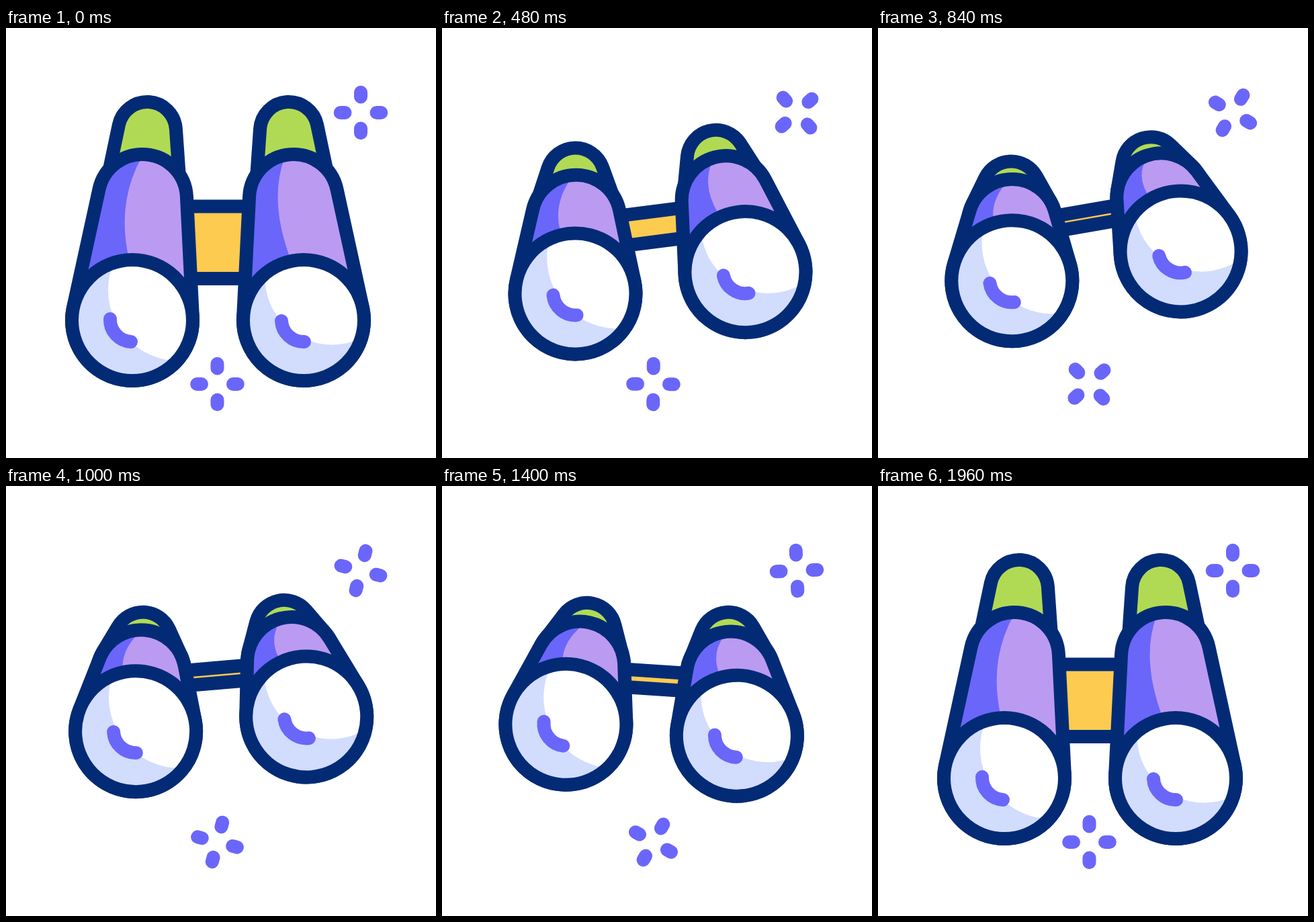
An HTML page that plays this animation: 640 px wide and 640 px high, repeating every 2000 ms.

```html
<!DOCTYPE html>
<html lang="en">
<head>
<meta charset="utf-8">
<title>Binoculars</title>
<style>
  html, body { margin: 0; width: 100%; height: 100%; overflow: hidden; background: #fff; }
  svg { display: block; width: 100vw; height: 100vh; }
  .line { stroke: #032b75; stroke-width: 20; stroke-linejoin: round; }
  .none { fill: none; }
  .green { fill: #b1da54; }
  .lilac { fill: #bb9af2; }
  .violet { fill: #6b66fa; }
  .yellow { fill: #fdcb50; }
  .pale { fill: #d2dcfd; }
  .white { fill: #fff; }
  .dash { fill: none; stroke: #6b66fa; stroke-width: 20; stroke-linecap: round; }
</style>
</head>
<body>
<svg id="stage" viewBox="0 0 640 640">
  <g id="body"><rect id="bridge" class="line yellow" x="255" width="121"/></g>
</svg>
<script>
const LOOP = 2000, STEP = 40;
const AXIS = 315.5, PIVOT_Y = 305;
const stage = document.getElementById('stage');
const body = document.getElementById('body');
const bridge = document.getElementById('bridge');

// shade: start, control and end of the barrel shadow edge, measured from the dome top
// glare: offset and radius of the white disc in the lens
const sides = [
  { id: 'left', mirror: x => x, shade: [202, -6, 163, 64, 184, 150], low: 80,
    glare: [69.5, -45, 105.5], arc: 'M-33-2A33 33 0 0 0-2 32' },
  { id: 'right', mirror: x => 2 * AXIS - x, shade: [415, -6, 390, 60, 425, 150], low: 330,
    glare: [42, -63, 99.5], arc: 'M-33 1A33 33 0 0 0 1 32' }
];

function addGroup(parent, markup) {
  const g = document.createElementNS('http://www.w3.org/2000/svg', 'g');
  g.innerHTML = markup;
  return parent.appendChild(g);
}

for (const s of sides) {
  const [gx, gy, gr] = s.glare;
  const g = addGroup(body, `
    <clipPath id="${s.id}-barrel"><path class="hull"/></clipPath>
    <clipPath id="${s.id}-lens"><circle r="90"/></clipPath>
    <path class="eye line green"/>
    <path class="hull lilac"/>
    <g clip-path="url(#${s.id}-barrel)"><path class="shade violet"/></g>
    <path class="hull line none"/>
    <g class="lens">
      <g clip-path="url(#${s.id}-lens)">
        <circle class="pale" r="90"/>
        <circle class="white" cx="${gx}" cy="${gy}" r="${gr}"/>
      </g>
      <circle class="line none" r="90"/>
      <path class="dash" d="${s.arc}"/>
    </g>`);
  s.eye = g.querySelector('.eye');
  s.hulls = g.querySelectorAll('.hull');
  s.shadow = g.querySelector('.shade');
  s.lens = g.querySelector('.lens');
}

const sparkles = [
  { x: 528, y: 126, from: 59, to: 1509 },
  { x: 314.5, y: 530, from: 429, to: 1859 }
];
for (const s of sparkles) {
  s.node = addGroup(stage,
    '<path class="dash" d="M0-30.3V-23.5M0 23.5V30.3M-30.3 0H-23.5M23.5 0H30.3"/>');
}

// Symmetric cubic Bezier ease (a, 0, 1 - a, 1)
function ease(u, a) {
  if (u <= 0) return 0;
  if (u >= 1) return 1;
  let lo = 0, hi = 1, s;
  for (let i = 0; i < 24; i++) {
    s = (lo + hi) / 2;
    const x = 3 * s * (1 - s) * ((1 - s) * a + s * (1 - a)) + s * s * s;
    if (x < u) lo = s; else hi = s;
  }
  return s * s * (3 - 2 * s);
}

function track(keys, t, a) {
  for (let i = 1; i < keys.length; i++) {
    const [t0, v0] = keys[i - 1], [t1, v1] = keys[i];
    if (t < t1) return v0 + (v1 - v0) * ease((t - t0) / (t1 - t0), a);
  }
  return keys[keys.length - 1][1];
}

const tiltKeys = [[20, 0], [800, 1], [1250, 1], [1960, 0]];
const turnKeys = [[0, 0], [800, -10], [1250, 4], [1960, 0]];
const liftKeys = [[480, 0], [1000, -5.5], [1250, 0]];

// Outline wrapped around an upper and a lower circle
function hull(x1, y1, r1, x2, y2, r2) {
  const axis = Math.atan2(y2 - y1, x2 - x1);
  const spread = Math.acos((r1 - r2) / Math.hypot(x2 - x1, y2 - y1));
  const at = (x, y, r, a) =>
    (x + r * Math.cos(a)).toFixed(2) + ' ' + (y + r * Math.sin(a)).toFixed(2);
  const l = axis + spread, r = axis - spread;
  return `M${at(x1, y1, r1, l)}A${r1} ${r1} 0 0 1 ${at(x1, y1, r1, r)}` +
    `L${at(x2, y2, r2, r)}A${r2} ${r2} 0 1 1 ${at(x2, y2, r2, l)}Z`;
}

function draw(t) {
  const tilt = track(tiltKeys, t, 0.667);
  const turn = track(turnKeys, t, 0.6);
  const lift = track(liftKeys, t, 0.667);
  const eyeY = 153 + 74 * tilt;
  const domeY = 254 + 22 * tilt;
  const lensY = 435 - 75 * tilt;
  const gap = 107.5 - 85 * tilt;

  body.setAttribute('transform',
    `translate(0 ${lift}) rotate(${turn} ${AXIS} ${PIVOT_Y})`);
  bridge.setAttribute('y', 319.3 - 32 * tilt - gap / 2);
  bridge.setAttribute('height', gap);

  for (const s of sides) {
    const domeX = s.mirror(203), lensX = s.mirror(188);
    s.eye.setAttribute('d', hull(s.mirror(210), eyeY, 43, domeX, domeY, 57 + 9 * tilt));
    const d = hull(domeX, domeY, 66, lensX, lensY, 90);
    s.hulls.forEach(h => h.setAttribute('d', d));

    const [x0, m0, cx, cm, x1, m1] = s.shade;
    const y = m => domeY - 56 + m * (1 - 0.5 * tilt);
    s.shadow.setAttribute('d',
      `M${x0} ${y(m0)}Q${cx} ${y(cm)} ${x1} ${y(m1)}L${s.low} ${y(m1) + 110}V${y(m0) - 20}H${x0}Z`);
    s.lens.setAttribute('transform', `translate(${lensX} ${lensY})`);
  }

  for (const s of sparkles) {
    const spin = 360 * ease((t - s.from) / (s.to - s.from), 0.55);
    s.node.setAttribute('transform', `translate(${s.x} ${s.y}) rotate(${spin})`);
  }
}

const start = performance.now();
function tick() {
  const t = (performance.now() - start) % LOOP;
  draw(Math.floor(t / STEP) * STEP);
  requestAnimationFrame(tick);
}
tick();
</script>
</body>
</html>
```
